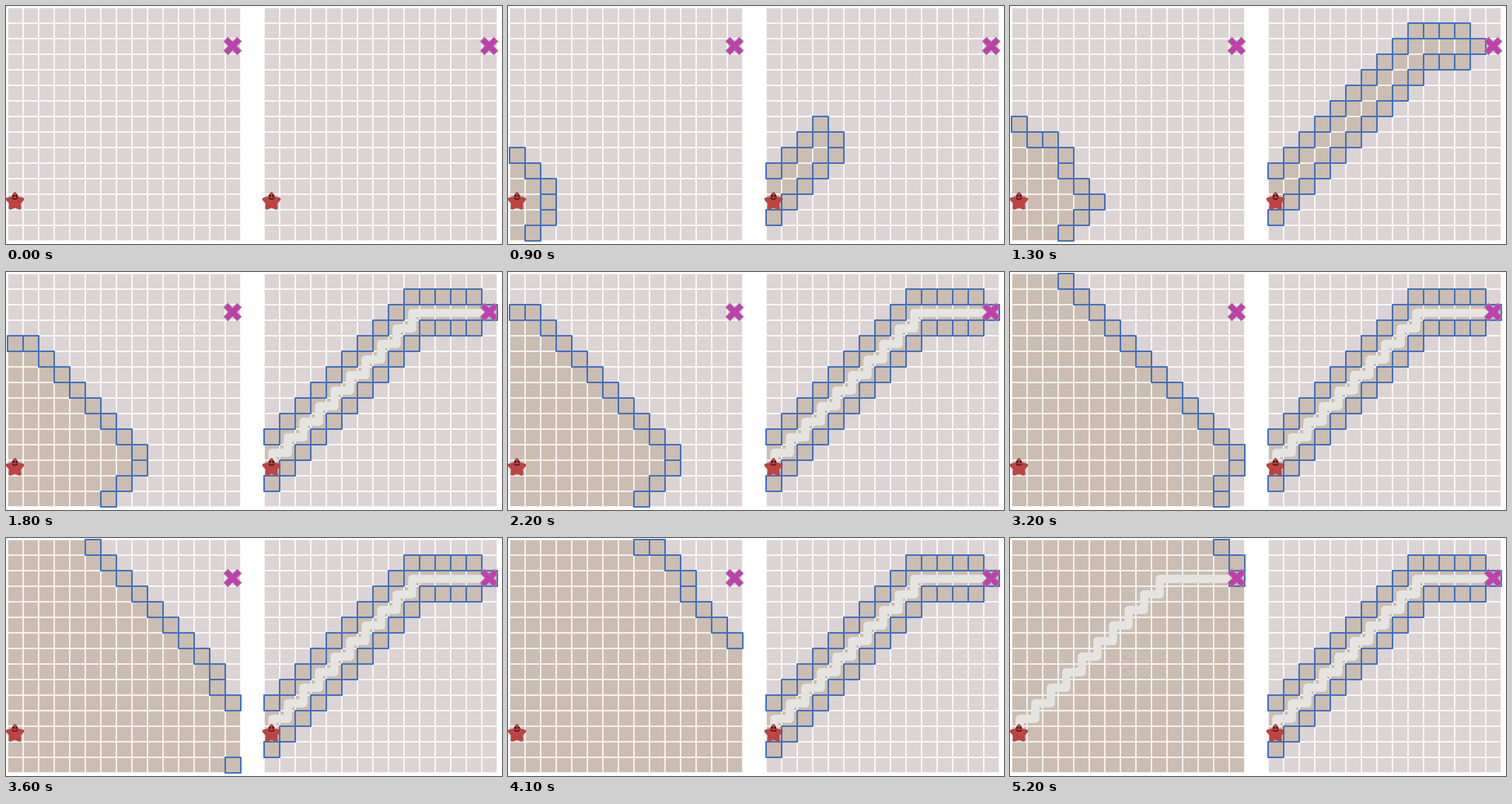
Animation of 638 by 306 pixels, one loop 5300 ms. Source, as a matplotlib script:

```python
import numpy as np
import matplotlib.pyplot as plt
from matplotlib.animation import FuncAnimation
from matplotlib.collections import LineCollection, PolyCollection
from matplotlib.colors import to_rgba

W, H, DPI = 638, 306, 100
PX = 72 / DPI
N, CELL = 15, 20
TOP, LEFTS = 1.5, (1.5, 331.5)
START, GOAL = (0, 12), (14, 2)
FLOOR, VISITED = to_rgba("#dcd3d4"), to_rgba("#cbbdb1")
BLUE, TRAIL = "#4470c0", "#e6e4e1"

CELLS = [(x, y) for y in range(N) for x in range(N)]


def neighbours(cell):
    x, y = cell
    around = [(x + 1, y), (x - 1, y), (x, y + 1), (x, y - 1)]
    return [(a, b) for a, b in around if 0 <= a < N and 0 <= b < N]


def breadth_key(cell):
    """Distance first, then closeness to the diagonal."""
    x, up = cell[0], START[1] - cell[1]
    return x + abs(up), abs(x - up), x


def staircase():
    x, y = START
    path = [START]
    while (x, y) != GOAL:
        if y > GOAL[1] and START[1] - y <= x:
            y -= 1
        else:
            x += 1
        path.append((x, y))
    return path


PATH = staircase()
BREADTH = sorted(CELLS, key=breadth_key)


def expanded_count(k):
    if k < 13:
        n = 23 * (max(k - 5, 0) / 8) ** 1.5
    else:
        n = np.interp(k, [13, 18, 27, 32, 41, 44, 46],
                      [23, 56, 112, 142, 199, 216, 221])
    return int(round(n))


fig = plt.figure(figsize=(W / DPI, H / DPI), dpi=DPI, facecolor="white")
ax = fig.add_axes([0, 0, 1, 1])
ax.set_xlim(0, W)
ax.set_ylim(H, 0)
ax.axis("off")


def draw_star(cx, cy):
    a = -np.pi / 2 + np.arange(10) * np.pi / 5
    r = np.where(np.arange(10) % 2 == 0, 10.4, 5.8)
    pts = np.c_[cx + r * np.cos(a), cy + r * np.sin(a)]
    for color, width in (("#96504c", 4), ("#c24141", 2.6)):
        ax.add_patch(plt.Polygon(pts, fc="#c24141", ec=color, lw=width * PX,
                                 joinstyle="round", zorder=6))
    for dx in (-2, 2):
        ax.add_patch(plt.Circle((cx + dx, cy - 7.5), 1.3, color="#2a1212",
                                lw=0, zorder=7))
    t = np.linspace(0, np.pi, 12)
    ax.plot(cx + 3 * np.cos(t), cy - 4.6 + 1.4 * np.sin(t), color="#2a1212",
            lw=1.2 * PX, zorder=7)


def draw_cross(cx, cy):
    for color, width, r in (("#a08a98", 8.4, 9), ("#c03fae", 6.8, 8.3)):
        for s in (-1, 1):
            ax.plot([cx - r, cx + r], [cy - s * r, cy + s * r], color=color,
                    lw=width * PX, solid_capstyle="butt", zorder=6)


class Board:
    def __init__(self, left, order):
        self.left, self.order = left, order
        self.squares = {c: self.square(c) for c in CELLS}
        self.fill = PolyCollection([self.squares[c] for c in CELLS], lw=0,
                                   antialiased=False, zorder=1)
        ax.add_collection(self.fill)
        size = N * CELL
        lines = []
        for i in range(N + 1):
            x, y = left + i * CELL, TOP + i * CELL
            lines += [[(x, TOP), (x, TOP + size)],
                      [(left, y), (left + size, y)]]
        ax.add_collection(LineCollection(lines, colors="white", lw=1.6 * PX,
                                         zorder=2))
        self.edge = PolyCollection([], facecolors="none", edgecolors=BLUE,
                                   lw=2 * PX, zorder=3)
        ax.add_collection(self.edge)
        px, py = zip(*map(self.center, PATH))
        self.trail, = ax.plot(px, py, color=TRAIL, lw=10.5 * PX, zorder=4,
                              solid_joinstyle="round",
                              solid_capstyle="round")
        draw_star(*self.center(START))
        draw_cross(*self.center(GOAL))

    def square(self, cell):
        x, y = self.left + cell[0] * CELL, TOP + cell[1] * CELL
        return [(x, y), (x + CELL, y), (x + CELL, y + CELL), (x, y + CELL)]

    def center(self, cell):
        return (self.left + (cell[0] + 0.5) * CELL,
                TOP + (cell[1] + 0.5) * CELL)

    def show(self, n, begun):
        last = self.order.index(GOAL)
        n = min(n, last)
        closed = set(self.order[:n])
        front = {b for c in closed for b in neighbours(c)} - closed
        if begun and not closed:
            front = {START}
        seen = closed | front
        self.fill.set_facecolor([VISITED if c in seen else FLOOR
                                 for c in CELLS])
        self.edge.set_verts([self.squares[c] for c in sorted(front)])
        self.trail.set_visible(n == last)


boards = [Board(LEFTS[0], BREADTH), Board(LEFTS[1], PATH)]


def update(k):
    for board in boards:
        board.show(expanded_count(k), k >= 4)
    return []


anim = FuncAnimation(fig, update, frames=53, interval=100, repeat=True,
                     repeat_delay=0, blit=False)
plt.show()
```
